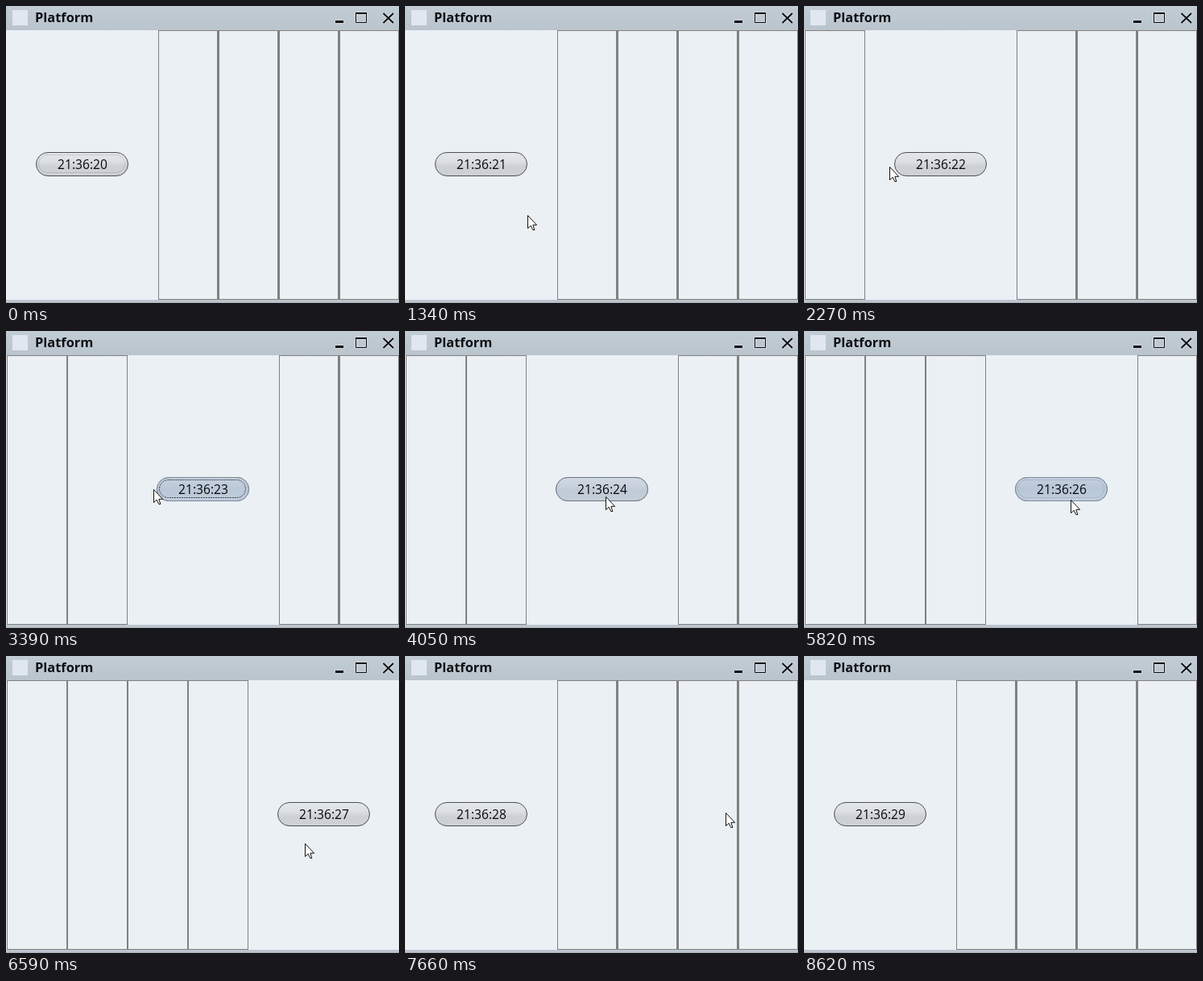
Recreate the animation shown at these times as an HTML page. Size 488 px wide and 368 px high, loop 8.68 s.

```html
<!DOCTYPE html>
<html lang="en">
<head>
<meta charset="utf-8">
<title>Platform</title>
<style>
  html, body { margin: 0; width: 100%; height: 100%; overflow: hidden; background: #ebf0f4; }
  svg { display: block; }
  text { font-family: "Open Sans", "Noto Sans", sans-serif; }
  #controls { fill: none; stroke: #0c0e10; filter: drop-shadow(0 0 1px #eef2f6); }
</style>
</head>
<body>
<svg width="488" height="368" viewBox="0 0 488 368">
  <defs>
    <linearGradient id="bar" x2="0" y2="1">
      <stop stop-color="#c2ccd5"/><stop offset="1" stop-color="#bac4cd"/>
    </linearGradient>
    <linearGradient id="idle" x2="0" y2="1">
      <stop stop-color="#e4e7eb"/><stop offset=".4" stop-color="#dbdee2"/>
      <stop offset=".6" stop-color="#cdd0d5"/><stop offset="1" stop-color="#cdd1d5"/>
    </linearGradient>
    <linearGradient id="hot" x2="0" y2="1">
      <stop stop-color="#c3cfde"/><stop offset=".5" stop-color="#b8c7d8"/><stop offset="1" stop-color="#c0cddc"/>
    </linearGradient>
  </defs>

  <rect width="488" height="368" fill="#ebf0f4"/>
  <rect width="488" height="30" fill="url(#bar)"/>
  <rect y="364" width="488" height="4" fill="#bcc5ce"/>
  <rect y="367" width="488" height="1" fill="#abb3bb"/>
  <rect x="8" y="5" width="19" height="19" fill="#e0e7ee"/>
  <text x="36" y="20" font-size="16.4" font-weight="700" fill="#0e1114">Platform</text>
  <g id="controls">
    <path d="M409 19.5h10" stroke-width="3"/>
    <path d="M434.5 8.5h13v12h-13z"/>
    <path d="M434 9h14" stroke-width="2"/>
    <path d="M468.5 9l12.5 12m0-12l-12.5 12" stroke-width="1.9"/>
  </g>

  <g id="panels" fill="#808080"></g>

  <g id="button">
    <rect x="37.5" y="181.5" width="114" height="29" rx="14.5" fill="url(#idle)" stroke="#4d5157"/>
    <rect id="glow" x="37.5" y="181.5" width="114" height="29" rx="14.5" fill="url(#hot)" stroke="#7f8c9a"/>
    <rect id="ring" x="40.5" y="184.5" width="107" height="22" rx="11" fill="none" stroke="#3f454c" stroke-dasharray="2 1"/>
    <text id="clock" x="95" y="202" font-size="15.6" text-anchor="middle" fill="#08090b"></text>
  </g>

  <path id="cursor" d="M.5 .5V16.5L4.2 13.2L6.8 18.5H8.8L6.9 12.3H11.6Z" fill="#fff" stroke="#111"/>
</svg>
<script>
const LOOP = 8680, TICK = 960, FIRST_TICK = 590, GONE = 8570;
const PRESS = 90, FADE_IN = 200, FADE_OUT = 210, DIP = 7.5;

// Where the pointer rests, when it travels there, and when its click moves the button on
const stops = [
  { x: 379, y: 358 },
  { x: 106, y: 199, leave: 975, arrive: 1560, swap: 2060 },
  { x: 183, y: 196, leave: 2520, arrive: 2890, swap: 3350 },
  { x: 251, y: 198, leave: 3640, arrive: 4130, swap: 4660 },
  { x: 331, y: 209, leave: 5160, arrive: 5640, swap: 5890 },
  { x: 398, y: 194, leave: 6340, arrive: 6960, swap: 7440 },
  { x: 445, y: 356, leave: 7970, arrive: 8340 }
];

const $ = id => document.getElementById(id);
const clamp = v => Math.max(0, Math.min(1, v));
const smooth = v => v * v * (3 - 2 * v);
const mix = (a, b, k) => a + (b - a) * k;

// Four slots left of the open column, then four right of it
const box = (x, edge) =>
  `<path d="M${x} 30h75v334h-75zM${x + 1} 31v332h${74 - edge}v-332z" fill-rule="evenodd"/>`;
const slots = [0, 1, 2, 3];
$("panels").innerHTML =
  slots.map(i => box(1 + 75 * i, 1)).join("") +
  slots.map(i => box(189 + 75 * i, 2)).join("");
const boxes = [...$("panels").children];

// Each trip swings sideways first and sags a little more than the one before.
function pointer(t) {
  const i = stops.findLastIndex(s => s.leave <= t);
  if (i < 1 || t > GONE) return null;
  const from = stops[i - 1], to = stops[i];
  const k = clamp((t - to.leave) / (to.arrive - to.leave));
  return [
    mix(from.x, to.x, Math.sin(k * Math.PI / 2)),
    mix(from.y, to.y, k) + DIP * (i - 1) * Math.sin(k * Math.PI)
  ];
}

function draw(t) {
  const done = stops.filter(s => s.swap <= t).length;
  const open = done % 5;
  boxes.forEach((b, i) => {
    const shown = i < 4 ? i < open : i - 4 >= open;
    b.style.display = shown ? "" : "none";
  });
  $("button").setAttribute("transform", `translate(${75 * open} 0)`);

  const next = stops[done + 1];
  const age = done ? t - stops[done].swap : LOOP;
  const rise = next.swap ? clamp((t - next.arrive) / FADE_IN + 1) : 0;
  const press = next.swap ? clamp((t - next.swap) / PRESS + 1) : 0;
  $("glow").setAttribute("opacity", Math.max(rise, smooth(1 - clamp(age / FADE_OUT))));
  $("ring").setAttribute("opacity", t < 30 ? .25 : Math.max(press, clamp(1.4 - age / 100)));

  const sec = 21 + Math.floor((t - FIRST_TICK) / TICK);
  $("clock").textContent = "21:36:" + sec;

  const p = pointer(t);
  $("cursor").style.display = p ? "" : "none";
  if (p) $("cursor").setAttribute("transform", `translate(${p.map(Math.round)})`);
}

const start = performance.now();
function frame() {
  draw((performance.now() - start) % LOOP);
  requestAnimationFrame(frame);
}
frame();
</script>
</body>
</html>
```
